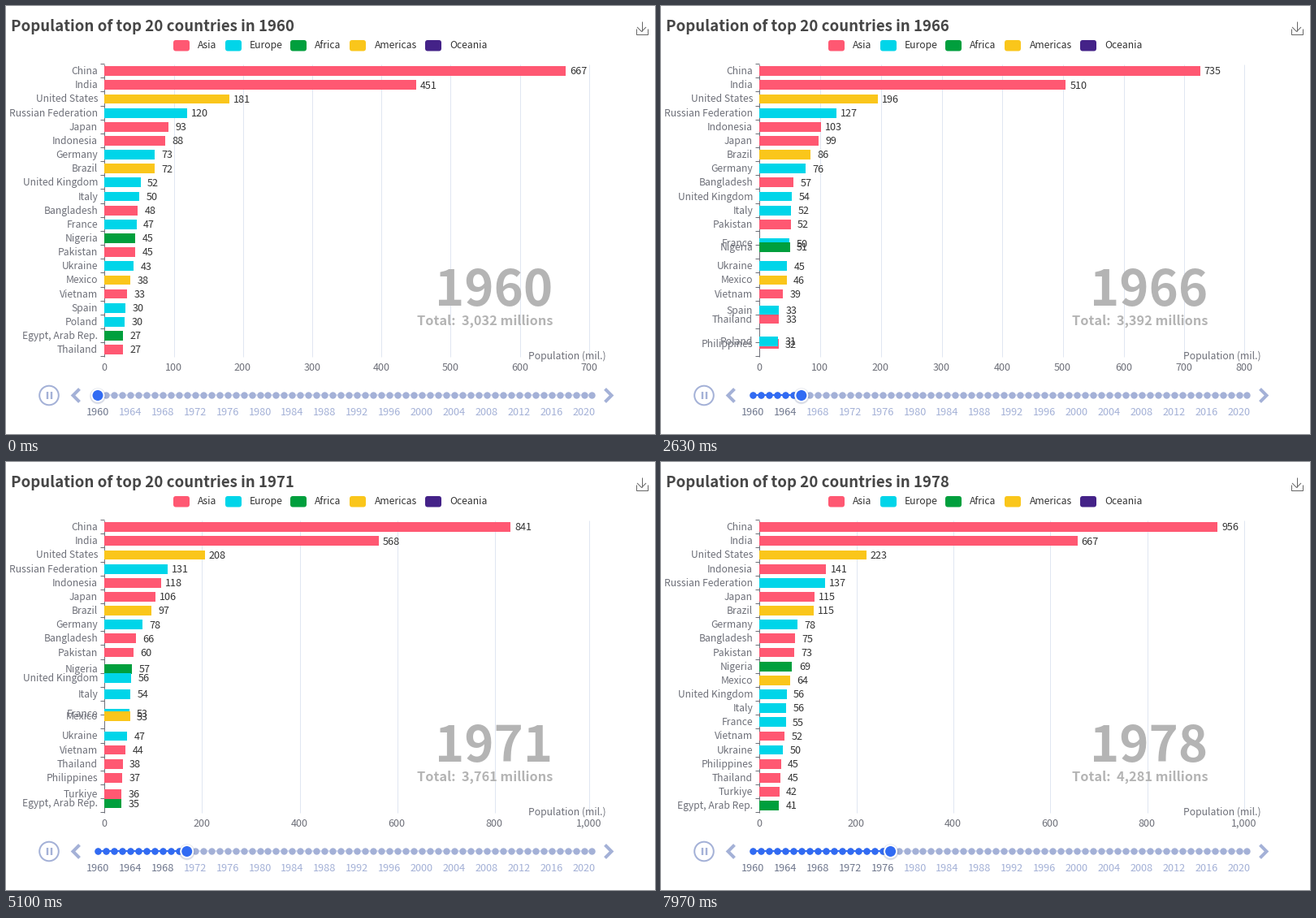
Recreate the animation shown at these times as a matplotlib script. Size 799x527 px, loop 8 s.

```python
import numpy as np
import matplotlib.pyplot as plt
from matplotlib.animation import FuncAnimation
from matplotlib.collections import LineCollection
from matplotlib.patches import Circle, FancyBboxPatch, Rectangle

W, H = 799, 527
LOOP, INTERVAL, STEP = 8000, 40, 5
SAMPLE_OFFSET = 15

LEFT, SPAN = 121.0, 596.5
TOP, PITCH, VISIBLE_ROWS = 71.6, 17.15, 21
BOTTOM = TOP + PITCH * VISIBLE_ROWS
MOVE_MS, AXIS_TAU, MARKER_LAG = 340, 204, 95

REGIONS = {
    "Asia": ("#ff5872", 206, 236),
    "Europe": ("#00d5e9", 270, 300),
    "Africa": ("#009f3d", 350, 380),
    "Americas": ("#fac61b", 423, 453.5),
    "Oceania": ("#442288", 516, 546),
}
LABEL, INK = "#6e7079", "#333333"
PALE, BLUE, DONE = "#a4b1d7", "#316bf3", "#6f778d"

# Millions of people at the key years; other years are interpolated.
KEY_YEARS = [1960, 1963, 1967, 1971, 1974, 1978]
COUNTRIES = [
    ("Bangladesh", "Asia", [48.15, 52.2, 58.7, 65.6, 69.3, 74.7]),
    ("Brazil", "Americas", [72.4, 78.7, 87.9, 97, 104.9, 114.7]),
    ("China", "Asia", [667.1, 682.3, 754.5, 841.1, 900.4, 956.2]),
    ("Egypt, Arab Rep.", "Africa", [26.7, 28.6, 32.4, 35.42, 38.227, 41.2]),
    ("France", "Europe", [46.6, 48.6, 51, 52.6, 53.9, 54.9]),
    ("Germany", "Europe", [72.8, 74.6, 76.95, 78.3, 79, 78.1]),
    ("India", "Asia", [450.6, 478.8, 520, 567.9, 609.2, 667.1]),
    ("Indonesia", "Asia", [88.4, 94.9, 105.9, 118.2, 127.1, 140.7]),
    ("Italy", "Europe", [50.2, 51.2, 52.7, 54.1, 55.1, 56.1]),
    ("Japan", "Asia", [93.2, 95.9, 99.9, 105.7, 110.2, 114.9]),
    ("Mexico", "Americas", [37.6, 41, 47.2, 53.2, 58, 64.2]),
    ("Nigeria", "Africa", [45.1, 47.7, 51.7, 56.8, 62, 69]),
    ("Pakistan", "Asia", [45, 47.65, 53.9, 60.1, 65.2, 73]),
    ("Philippines", "Asia", [26.3, 29.3, 32.7, 36.8, 40.3, 45.4]),
    ("Poland", "Europe", [29.6, 30.55, 31.7, 32.7, 33.6, 35.1]),
    ("Russian Federation", "Europe", [119.9, 124.3, 128.2, 130.8, 133.4, 136.6]),
    ("Spain", "Europe", [30.4, 31.3, 33, 34.2, 35.1, 36.8]),
    ("Thailand", "Asia", [26.6, 29.9, 33.9, 38, 41.3, 44.8]),
    ("Turkiye", "Asia", [26.4, 29.55, 31.6, 35.68, 38.2, 41.8]),
    ("Ukraine", "Europe", [42.7, 43.9, 46, 47.3, 48.3, 49.7]),
    ("United Kingdom", "Europe", [52.4, 53.55, 54.55, 55.9, 56.2, 56.2]),
    ("United States", "Americas", [180.7, 189.2, 198.7, 207.7, 213.9, 222.6]),
    ("Vietnam", "Asia", [32.7, 35.6, 40.2, 44.2, 48, 52.3]),
]
EXTRA_YEARS = {
    "China": {1961: 660.3, 1962: 665.8, 1964: 698.4, 1965: 715.2},
    "Russian Federation": {1965: 126.6},
}
WORLD = {1960: 3032, 1961: 3072, 1962: 3125, 1963: 3190, 1965: 3322,
         1967: 3462, 1971: 3761, 1974: 3988, 1978: 4281}

# Moments at which 1961, 1962, ... take over.
STARTS = np.array([110, 620, 870, 1310, 1770, 2400, 3060, 3590, 4000,
                   4400, 4800, 5240, 5680, 6090, 6550, 7000, 7450, 7885])


def yearly_values(name, values):
    points = {**dict(zip(KEY_YEARS, values)), **EXTRA_YEARS.get(name, {})}
    years = sorted(points)
    return np.interp(range(1960, 1979), years, [points[y] for y in years])


VALUES = np.array([yearly_values(n, v) for n, _, v in COUNTRIES]).T
TOTALS = np.interp(range(1960, 1979), list(WORLD), list(WORLD.values()))


def nice_axis(peak):
    raw = peak / 5
    base = 10 ** np.floor(np.log10(raw))
    lead = raw / base
    factor = next((f for limit, f in ((1.5, 1), (2.5, 2), (4, 3), (7, 5))
                   if lead < limit), 10)
    step = factor * base
    return step, np.ceil(peak / step) * step


def ranks(widths):
    return np.argsort(np.argsort(-widths, kind="stable")).astype(float)


def simulate():
    """Bars glide to new widths; rows swap whenever two bars cross."""
    year, start = 0, -MOVE_MS
    step, cap = nice_axis(VALUES[0].max())
    axis_max = cap
    target = VALUES[0] / cap * SPAN
    width, width0 = target.copy(), target.copy()
    goal = ranks(width)
    row, row0 = goal.copy(), goal.copy()
    row_start = np.full(len(goal), -MOVE_MS, float)
    states = []
    for t in range(0, LOOP, STEP):
        now = int(np.sum(STARTS <= t))
        if now != year:
            year, start, width0 = now, t, width.copy()
            step, cap = nice_axis(VALUES[year].max())
            target = VALUES[year] / cap * SPAN
        width = width0 + (target - width0) * min(1, (t - start) / MOVE_MS)
        order = ranks(width)
        moved = order != goal
        row0[moved], row_start[moved] = row[moved], t
        goal = order
        row = row0 + (goal - row0) * np.clip((t - row_start) / MOVE_MS, 0, 1)
        axis_max += (cap - axis_max) * (1 - np.exp(-STEP / AXIS_TAU))
        if t % INTERVAL == SAMPLE_OFFSET:
            marker = int(np.sum(STARTS + MARKER_LAG <= t))
            states.append((year, marker, width, row, axis_max, step, cap))
    return states


STATES = simulate()

plt.rcParams["font.family"] = ["Noto Sans CJK JP"]
fig = plt.figure(figsize=((W + .01) / 72, (H + .01) / 72), dpi=72,
                 facecolor="white")
ax = fig.add_axes([0, 0, 1, 1])
ax.set_xlim(0, W)
ax.set_ylim(H, 0)
ax.axis("off")


def text(x, y, s="", size=12.1, color=LABEL, ha="left", z=5, **kw):
    return ax.text(x, y, s, fontsize=size, color=color, ha=ha,
                   va="baseline", zorder=z, **kw)


def line(xs, ys, color, lw, z=3, cap="butt"):
    return ax.plot(xs, ys, color=color, lw=lw, zorder=z, solid_capstyle=cap,
                   solid_joinstyle="miter")[0]


# Header
title = text(6, 31, size=18.65, color="#464646", weight="bold")
for name, (color, swatch_x, text_x) in REGIONS.items():
    ax.add_patch(FancyBboxPatch((swatch_x + 3, 45), 14, 7.5, fc=color, lw=0,
                                boxstyle="round,pad=3,rounding_size=3.2"))
    text(text_x, 52.3, name, color=INK)
line([782.5, 782.5], [19, 31.5], "#666666", 1)
line([777, 782.5, 788], [26, 31.5, 26], "#666666", 1)
line([775.5, 775.5, 789.5, 789.5], [28, 35.5, 35.5, 28], "#666666", 1)

# Axes
grid = LineCollection([], colors="#e0e6f1", linewidths=1, zorder=1)
ax.add_collection(grid)
line([120.5, 120.5], [TOP, BOTTOM], LABEL, 1)
edges = np.floor(TOP + PITCH * np.arange(VISIBLE_ROWS + 1)) + .5
ax.add_collection(LineCollection([[(116, y), (121, y)] for y in edges],
                                 colors=LABEL, linewidths=1, zorder=3))
tick_labels = [text(0, 448.8, size=12.5, ha="center") for _ in range(11)]
text(690.5, 435.3, "Population (mil.)", size=12.2, ha="center")

# Large year and total
big_year = text(673, 368.5, size=61.5, color="#b4b4b4", ha="right", z=2,
                weight="bold")
total = text(673, 393, size=16.3, color="#b4b4b4", ha="right", z=2,
             weight="bold")

# Bars
bars, names, numbers = [], [], []
for i, (name, region, _) in enumerate(COUNTRIES):
    z = 4 + i * .01
    bars.append(ax.add_patch(Rectangle((LEFT, 0), 0, 11.8, lw=0, zorder=z,
                                       fc=REGIONS[region][0])))
    names.append(text(113, 0, name, ha="right", z=z))
    numbers.append(text(0, 0, size=12.6, color=INK, z=z))

# Timeline
MID = 479.5
dot_x = 113 + 9.975 * np.arange(62)
ax.add_patch(Circle((53, MID), 11.8, fc="none", ec=PALE, lw=2))
for x in (50.5, 55.5):
    line([x, x], [475, 484], PALE, 2.4)
line([90.5, 82.5, 90.5], [471.5, MID, 487.5], PALE, 4)
line([737.5, 745.5, 737.5], [471.5, MID, 487.5], PALE, 4)
line([dot_x[0], dot_x[-1]], [MID, MID], "#dae1f5", 2, z=2)
progress = line([], [], BLUE, 2, z=4)
ax.plot(dot_x, np.full(62, MID), "o", ms=8.4, mew=0, color=PALE, zorder=3)
passed, = ax.plot([], [], "o", ms=8.4, mew=0, color=BLUE, zorder=5)
shadow = [ax.add_patch(Circle((0, MID + .8), r, fc="#50608c", alpha=.13, lw=0,
                              zorder=6)) for r in (9.2, 10)]
marker_dot = ax.add_patch(Circle((0, MID), 7.5, fc=BLUE, ec="white", lw=2,
                                 zorder=7))
year_labels = [text(x, 504, str(1960 + 4 * k), size=12.7, ha="center")
               for k, x in enumerate(dot_x[::4])]


def draw_axis(axis_max, step, cap):
    ticks = [(v, v / axis_max) for v in np.arange(0, cap, step)
             if v < axis_max * .97] + [(cap, 1)]
    for label in tick_labels:
        label.set_visible(False)
    segments = []
    for label, (value, share) in zip(tick_labels, ticks):
        x = LEFT + share * SPAN
        label.set_text(f"{value:,.0f}")
        label.set_x(x)
        label.set_visible(True)
        x = np.round(x - .6) + .5
        segments.append([(x, TOP), (x, BOTTOM)])
    grid.set_segments(segments[1:])


def draw_timeline(marker):
    x = dot_x[marker]
    progress.set_data([dot_x[0], x], [MID, MID])
    passed.set_data(dot_x[:marker + 1], np.full(marker + 1, MID))
    for disc in shadow:
        disc.center = (x, MID + .8)
    marker_dot.center = (x, MID)
    for k, label in enumerate(year_labels):
        label.set_color(DONE if 4 * k <= marker else PALE)


def update(frame):
    year, marker, widths, rows, axis_max, step, cap = STATES[frame]
    title.set_text(f"Population of top 20 countries in {1960 + year}")
    big_year.set_text(str(1960 + year))
    total.set_text(f"Total:  {TOTALS[year]:,.0f} millions")
    for bar, name, number, w, row, value in zip(bars, names, numbers, widths,
                                                rows, VALUES[year]):
        y = TOP + PITCH * (row + .5)
        shown = row < VISIBLE_ROWS - .4
        for artist in (bar, name, number):
            artist.set_visible(shown)
        bar.set_y(y - 5.9)
        bar.set_width(w)
        name.set_y(y + 4)
        number.set_text(f"{value:.0f}")
        number.set_position((LEFT + w + (5 if value >= 99.5 else 8.5), y + 4.3))
    draw_axis(axis_max, step, cap)
    draw_timeline(marker)
    return []


anim = FuncAnimation(fig, update, frames=len(STATES), interval=INTERVAL,
                     init_func=lambda: update(0), repeat=True, repeat_delay=0,
                     cache_frame_data=False)
plt.show()
```
